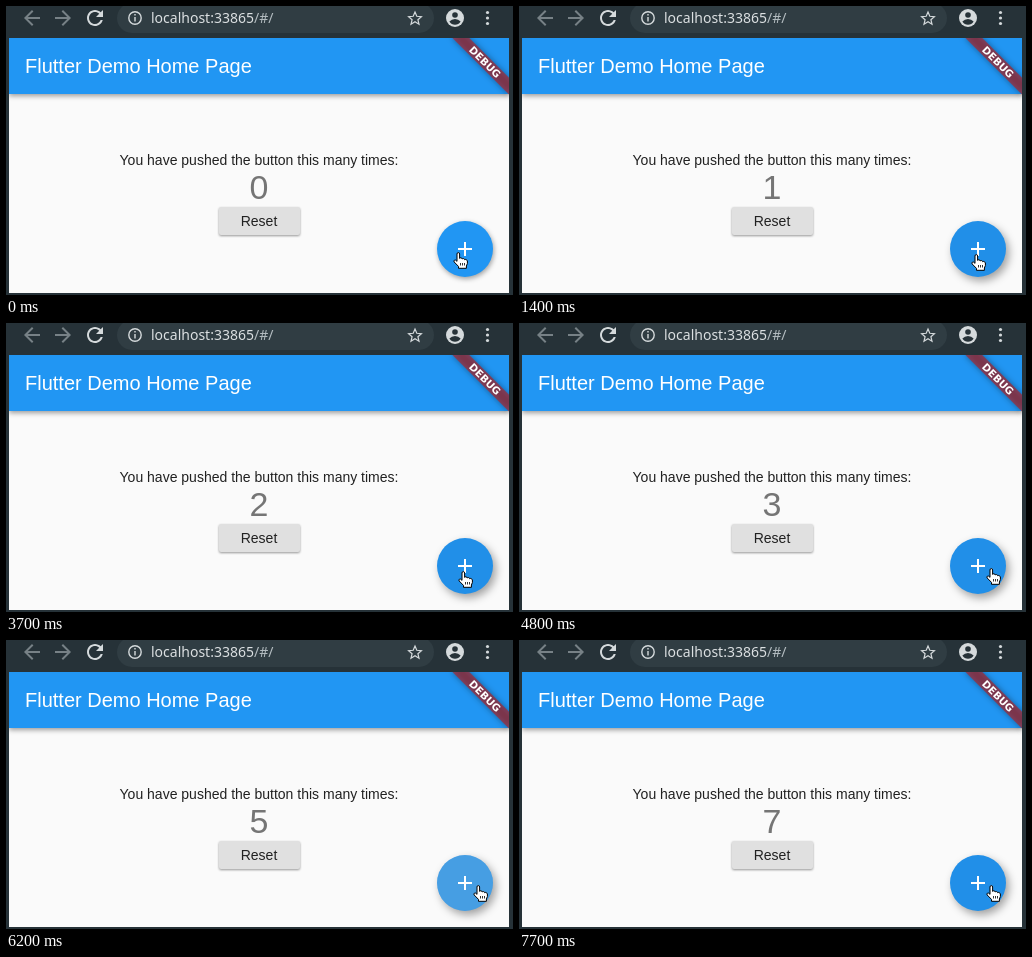
An HTML page that plays this animation: 507x289 px, repeating every 8 s.

```html
<!DOCTYPE html>
<html lang="en">
<head>
<meta charset="utf-8">
<title>Counter demo</title>
<style>
  html, body { margin: 0; width: 100%; height: 100%; overflow: hidden; background: #263238; }
  svg { display: block; width: 507px; height: 289px; font-family: "Liberation Sans", Arial, sans-serif; }
  .url { font: 14px "Noto Sans", "Open Sans", sans-serif; }
  .banner { font: bold 10.2px "DejaVu Sans", sans-serif; }
  .body { font-size: 14px; fill: #212121; }
  .mid { text-anchor: middle; }
  .line { fill: none; stroke: #d5dadc; }
  .bar { filter: drop-shadow(0 2px 2.5px rgba(0, 0, 0, .38)); }
  .button { filter: drop-shadow(.5px 1.5px 1px rgba(0, 0, 0, .4)); }
  .ribbon { filter: drop-shadow(0 0 3px rgba(0, 0, 0, .6)); }
</style>
</head>
<body>
<svg viewBox="0 0 507 289">
  <defs>
    <clipPath id="page"><rect x="3" y="32" width="500" height="255"/></clipPath>
    <clipPath id="disc"><circle cx="459" cy="243" r="28"/></clipPath>
    <path id="arrow" d="M20 11H7.83l5.59-5.59L12 4l-8 8 8 8 1.41-1.41L7.83 13H20z"/>
  </defs>

  <!-- browser toolbar -->
  <rect width="507" height="289" fill="#263238"/>
  <rect x="111" y="-3" width="317" height="30" rx="15" fill="#303d43"/>
  <use href="#arrow" x="14" fill="#778186"/>
  <use href="#arrow" transform="translate(69) scale(-1 1)" fill="#778186"/>
  <path transform="translate(77)" fill="#d5dadc" d="M17.65 6.35C16.2 4.9 14.21 4 12 4c-4.42 0-7.99 3.58-7.99 8s3.57 8 7.99 8c3.73 0 6.84-2.55 7.73-6h-2.08c-.82 2.33-3.04 4-5.65 4-3.31 0-6-2.69-6-6s2.69-6 6-6c1.66 0 3.14.69 4.22 1.78L13 11h7V4z"/>
  <g class="line" stroke-width="1.4">
    <circle cx="129" cy="12" r="6.2"/>
    <path d="M129 11v4.5M129 8v1.5"/>
  </g>
  <text class="url" x="145" y="17" fill="#dce0e2">localhost:33865<tspan fill="#b4bdc1">/#/</tspan></text>
  <path class="line" stroke-width="1.2" d="M409 6l1.8 4.3 4.6.4-3.5 3 1.1 4.5-4-2.4-4 2.4 1.1-4.5-3.5-3 4.6-.4z"/>
  <g fill="#d5dadc">
    <circle cx="449" cy="12" r="9"/>
    <g fill="#263238">
      <circle cx="449" cy="9" r="2.8"/>
      <path d="M443.4 15.6q2.2-2.6 5.6-2.6t5.6 2.6q-2 3.2-5.6 3.2t-5.6-3.2z"/>
    </g>
    <circle cx="481.5" cy="6.5" r="1.6"/>
    <circle cx="481.5" cy="12" r="1.6"/>
    <circle cx="481.5" cy="17.5" r="1.6"/>
  </g>

  <g clip-path="url(#page)">
    <rect x="3" y="32" width="500" height="255" fill="#fafafa"/>
    <rect class="bar" x="3" y="32" width="500" height="56" fill="#2196f3"/>
    <text x="19" y="67" font-size="20" fill="#fff">Flutter Demo Home Page</text>

    <text class="body mid" x="253" y="159">You have pushed the button this many times:</text>
    <text class="mid" id="count" x="253" y="193" font-size="34" fill="#757575">0</text>
    <rect class="button" x="213" y="201" width="81" height="28" rx="2" fill="#e0e0e0"/>
    <text class="body mid" x="253" y="220">Reset</text>

    <circle id="fab" cx="459" cy="243" r="28"/>
    <g clip-path="url(#disc)"><circle id="splash" fill="#c8d0d0"/></g>
    <path d="M452 243h14M459 236v14" stroke="#fff" stroke-width="2"/>

    <g transform="translate(503 32) rotate(45)">
      <rect class="ribbon" x="-40" y="28" width="80" height="12" fill="#b71c1c" fill-opacity=".627"/>
      <text class="banner mid" y="37.7" fill="#fff">DEBUG</text>
    </g>
  </g>

  <g id="hand" stroke="#000" stroke-linejoin="round">
    <path fill="#fff" d="M4 2Q4 .6 5.3 .6T6.6 2V6.4Q7 5.6 8 5.8T9.2 7Q9.8 6.3 10.7 6.6T11.8 7.8Q12.3 7.2 13.2 7.6T14.4 9V11.5L13.4 14V16.3H5.5V14.4L1.2 10Q.4 8.8 1.4 8.2T3.2 8.6L4 9.4Z"/>
    <path stroke-width=".8" d="M7.5 11v2.5M9.5 11v2.5M11.5 11v2.5"/>
  </g>
</svg>
<script>
  const LOOP = 8000, STEP = 100;
  const clicks = [1100, 3400, 4500, 5300, 6100, 6800, 7400];
  const splashAlpha = [.12, .22, .1, 0];
  const path = [
    { at: 0, x: 447, y: 246 }, { at: 100, x: 450, y: 247 }, { at: 200, x: 452, y: 248 },
    { at: 4000, x: 460, y: 246 }, { at: 4100, x: 467, y: 245 }
  ];
  const [count, fab, splash, hand] =
    ['count', 'fab', 'splash', 'hand'].map(id => document.getElementById(id));
  const mix = (a, b, k) => a + (b - a) * k;

  function setAttrs(el, attrs) {
    for (const name in attrs) el.setAttribute(name, attrs[name]);
  }

  function draw(t) {
    const pos = path.filter(p => p.at <= t).pop();
    hand.setAttribute('transform', `translate(${pos.x} ${pos.y})`);

    const hover = Math.min(t / 200, 1);
    fab.style.fill = `rgb(33, ${mix(150, 143, hover)}, ${mix(243, 232, hover)})`;
    fab.style.filter = `drop-shadow(${mix(1.5, 3, hover)}px ${mix(2.5, 4, hover)}px ` +
      `${mix(2.5, 4, hover)}px rgba(0, 0, 0, .36))`;

    const done = clicks.filter(c => c <= t);
    count.textContent = done.length;
    const age = done.length ? (t - done[done.length - 1]) / STEP : 3;
    setAttrs(splash, {
      cx: pos.x + 5, cy: pos.y + 1,
      r: age < 1 ? 24 : 56,
      'fill-opacity': splashAlpha[age] || 0
    });
  }

  const start = performance.now();
  function tick() {
    const t = (performance.now() - start) % LOOP;
    draw(Math.floor(t / STEP) * STEP);
    requestAnimationFrame(tick);
  }
  tick();
</script>
</body>
</html>
```
